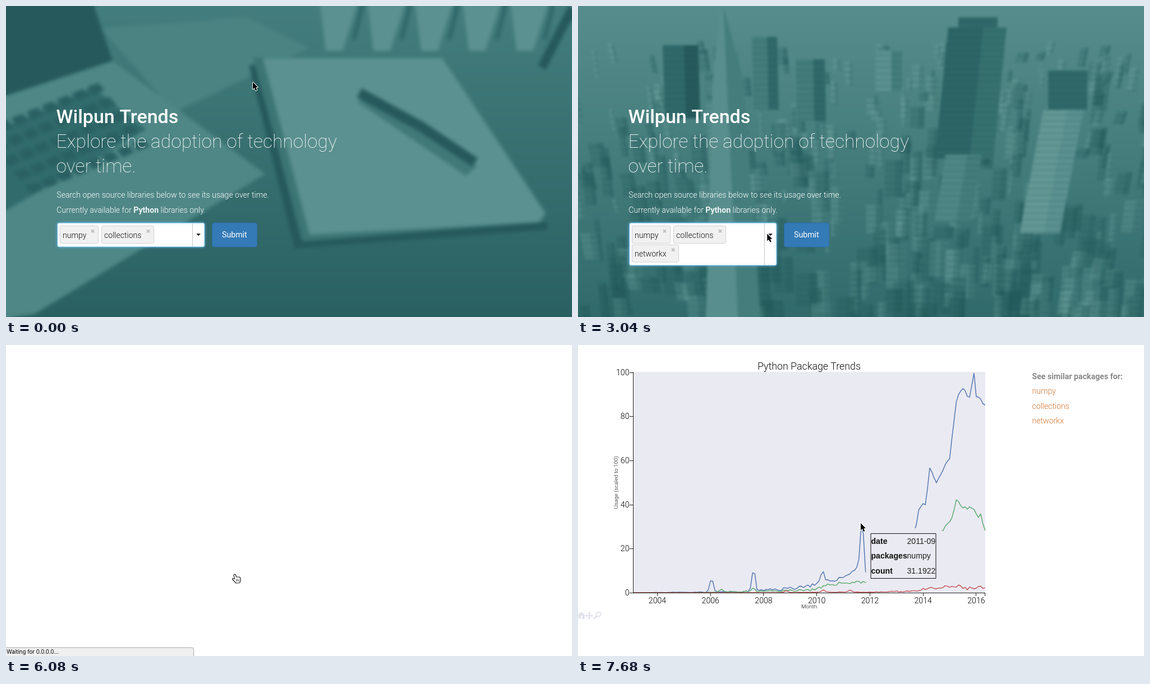
Recreate the animation shown at these times as an HTML page with a canvas. Size 1009x555 px, loop 8 s.

```html
<!DOCTYPE html>
<html lang="en">
<head>
<meta charset="utf-8">
<title>Package trends</title>
<style>
html, body { margin: 0; width: 100%; height: 100%; overflow: hidden; background: #fff; }
canvas { display: block; }
</style>
</head>
<body>
<canvas id="stage" width="1009" height="555"></canvas>
<script>
const W = 1009, H = 555, LOOP = 8000, STEP = 160;
const ROBOTO = 'Roboto, sans-serif';
const ARIAL = '"Liberation Sans", Arial, sans-serif';
const BODY = `300 14.08px ${ROBOTO}`;
const BOLD = `700 14.08px ${ROBOTO}`;
const ctx = document.getElementById('stage').getContext('2d');

const clamp = v => Math.max(0, Math.min(1, v));
const progress = (t, a, b) => clamp((t - a) / (b - a));
const easeOut = p => 1 - (1 - p) * (1 - p);
const smooth = p => p * p * (3 - 2 * p);
const mix = (a, b, p) => a + (b - a) * p;

function random(seed) {
  return () => (seed = (seed * 16807) % 2147483647) / 2147483647;
}

function text(str, x, y, font, color, align = 'left') {
  ctx.font = font;
  ctx.fillStyle = color;
  ctx.textAlign = align;
  ctx.fillText(str, x, y);
  return x + ctx.measureText(str).width;
}

function trace(g, pts) {
  g.beginPath();
  for (let i = 0; i < pts.length; i += 2) g.lineTo(pts[i], pts[i + 1]);
}

function fill(g, color, ...pts) {
  trace(g, pts);
  g.fillStyle = color;
  g.fill();
}

function stroke(g, color, width, ...pts) {
  trace(g, pts);
  g.strokeStyle = color;
  g.lineWidth = width;
  g.stroke();
}

function rect(g, color, x, y, w, h) {
  g.fillStyle = color;
  g.fillRect(x, y, w, h);
}

function box(x, y, w, h, r, color, border) {
  ctx.beginPath();
  ctx.roundRect(x + 0.5, y + 0.5, w - 1, h - 1, r);
  ctx.fillStyle = color;
  ctx.fill();
  ctx.strokeStyle = border;
  ctx.lineWidth = 1;
  ctx.stroke();
}

// ---- blurred backdrops, painted once ----

const DARK = '#25595b', DIM = '#306869', MID = '#457d7d', LIGHT = '#5b9190';
const shade = a => `rgba(32,86,88,${a})`;
const shine = a => `rgba(125,178,174,${a})`;

function scene(top, bottom, blur, paint) {
  const layer = () => Object.assign(document.createElement('canvas'), { width: W, height: H });
  const sharp = layer(), soft = layer();
  const g = sharp.getContext('2d'), out = soft.getContext('2d');
  const sky = g.createLinearGradient(0, 0, 0, H);
  sky.addColorStop(0, top);
  sky.addColorStop(1, bottom);
  rect(g, sky, 0, 0, W, H);
  paint(g);
  out.drawImage(sharp, 0, 0);
  out.filter = `blur(${blur}px)`;
  out.drawImage(sharp, 0, 0);
  return soft;
}

const desk = scene('#447d7d', '#2a6061', 3, g => {
  fill(g, '#4b8383', 170, 40, 430, 20, 540, 75, 300, 190);
  // laptop
  fill(g, '#4f8786', 0, 160, 190, 98, 462, 300, 50, 550, 0, 555);
  fill(g, DARK, 0, 0, 157, 0, 190, 98, 0, 160);
  fill(g, '#316b6c', 0, 215, 155, 145, 250, 220, 0, 365);
  for (let i = 0; i < 40; i++) {
    const col = i % 8, row = Math.floor(i / 8);
    const x = col * 27 + row * 20 - 45, y = 222 + row * 25 - col * 11;
    fill(g, '#2a6062', x, y, x + 20, y - 8, x + 32, y + 5, x + 11, y + 14);
  }
  // notebook and pen
  stroke(g, DARK, 14, 440, 105, 520, 425, 965, 392);
  fill(g, '#3d7575', 440, 92, 780, 92, 960, 385, 530, 420);
  fill(g, LIGHT, 458, 93, 778, 93, 962, 370, 950, 386, 541, 408);
  fill(g, '#417878', 625, 170, 640, 165, 840, 285, 820, 303);
  stroke(g, DARK, 18, 630, 155, 740, 215, 836, 279);
  // glasses
  for (let i = 0; i < 5; i++) {
    const x = 560 + i * 85;
    fill(g, LIGHT, x, 0, x + 65, 0, x + 40, 80, x + 10, 80);
    stroke(g, DIM, 8, x + 75, 0, x + 60, 60);
  }
  stroke(g, DARK, 16, 1009, 5, 955, 110);
});

const city = scene('#578d8c', '#316a6b', 2, g => {
  const rnd = random(71);
  const tower = (x, y, w, h, lean, lit, dark) => {
    fill(g, lit, x, y, x + w, y, x + w + lean, y + h, x + lean, y + h);
    fill(g, dark, x + w * 0.6, y, x + w, y, x + w + lean, y + h, x + w * 0.6 + lean, y + h);
    for (let d = 8; d < h; d += 11)
      stroke(g, shade(0.22), 3, x + lean * d / h, y + d, x + w + lean * d / h, y + d);
  };
  for (let i = 0; i < 420; i++) {
    const y = 60 + 480 * i / 420, x = rnd() * 1050 - 30, s = 0.6 + y / 700;
    tower(x, y, (8 + rnd() * 24) * s, (18 + rnd() * 60) * s, (500 - x) / 60,
      rnd() < 0.45 ? shine(0.24) : shade(0.2), shade(0.25));
  }
  tower(151, 70, 63, 130, 4, DIM, DARK);
  tower(310, 55, 45, 130, 3, MID, DIM);
  tower(388, 95, 52, 110, 2, MID, DIM);
  tower(530, 80, 48, 72, 0, LIGHT, MID);
  fill(g, '#588e8d', 254, 0, 259, 0, 294, 130, 325, 555, 228, 555, 240, 130);
  fill(g, MID, 259, 0, 294, 130, 325, 555, 285, 555);
  tower(678, 20, 70, 30, 0, DIM, DIM);
  tower(660, 38, 104, 235, -24, '#2d6566', '#36706f');
  tower(655, 265, 65, 120, -20, '#4f8786', MID);
  tower(838, 115, 70, 70, 0, DIM, DIM);
  tower(829, 186, 72, 220, -42, '#639896', '#5b9190');
});

const room = scene('#1c5153', '#235a5c', 2, g => {
  fill(g, '#296163', 565, 85, 660, 0, 1009, 0, 1009, 330, 760, 230, 740, 115, 590, 180);
  // window
  fill(g, '#619694', 160, 160, 205, 103, 535, 115, 540, 390, 485, 395, 480, 470, 165, 475);
  for (const x of [294, 418, 538]) stroke(g, '#2b6264', 8, x, 100, x + 2, 480);
  for (const y of [168, 248, 328]) stroke(g, '#2f6768', 9, 160, y - 4, 540, y + 4);
  fill(g, DARK, 150, 110, 205, 103, 165, 165, 170, 475, 150, 475);
  // chairs and table
  rect(g, DARK, 185, 278, 116, 20);
  rect(g, '#316a6b', 160, 495, 380, 60);
  stroke(g, DARK, 13, 150, 487, 350, 490, 540, 480);
  for (let x = 195; x < 370; x += 28) stroke(g, '#1e5355', 8, x, 390, x + (x - 270) / 4, 555);
  for (const y of [397, 444]) stroke(g, '#1c4f51', 12, 484, y, 560, y - 2);
  for (const x of [488, 542]) stroke(g, '#1c4f51', 8, x, 395, x, 555);
  // lamps
  fill(g, '#74a7a4', 0, 97, 22, 97, 32, 116, 0, 115);
  for (const x of [82, 108, 153]) rect(g, LIGHT, x - 3, 97, 7, 18);
  for (let i = 0; i < 12; i++) rect(g, shine(0.13), 90 + i % 4 * 32, 5 + i * 3, 9, 16);
  rect(g, '#316a6b', 203, 0, 6, 70);
  stroke(g, MID, 9, 562, 82, 600, 45, 660, -5);
  stroke(g, DIM, 4, 629, 0, 629, 85);
  rect(g, '#75a8a5', 621, 84, 15, 12);
  // shelves
  const rnd = random(9);
  rect(g, '#225658', 590, 190, 78, 200);
  for (let row = 0; row < 6; row++) {
    const y = 198 + row * 31;
    for (let k = 0; k < 7; k++)
      rect(g, shine(rnd() * 0.6), 594 + k * 10.5, y + 6 - k * 3, 8, 22);
    stroke(g, '#4a8282', 3, 588, y, 667, y - 20);
  }
  fill(g, '#1c5052', 655, 112, 735, 112, 725, 155, 755, 220, 810, 300, 790, 450, 670, 445);
  fill(g, '#1f5456', 560, 470, 700, 455, 1009, 450, 1009, 555, 560, 555);
});

// ---- pointers ----

function arrow(x, y) {
  ctx.save();
  ctx.translate(x, y);
  ctx.scale(0.9, 0.9);
  ctx.lineJoin = 'round';
  const shape = [0, 0, 0, 14, 3.2, 11.2, 5.6, 16.6, 8.2, 15.5, 5.8, 10.2, 10, 10, 0, 0];
  stroke(ctx, '#fff', 2, ...shape);
  fill(ctx, '#000', ...shape);
  ctx.restore();
}

function hand(x, y) {
  ctx.save();
  ctx.translate(x, y);
  ctx.lineJoin = 'round';
  const shape = [-1, 1, 1, 0, 2.5, 1.5, 3.6, 5, 9, 5, 11, 7, 11, 12, 9.5, 15.5, 3, 16, -3.5, 9, -3, 7.3, 0.4, 8.5, -1, 1];
  fill(ctx, '#fff', ...shape);
  stroke(ctx, '#222', 1.2, ...shape);
  for (const i of [3.5, 5.7, 7.9]) stroke(ctx, '#222', 0.8, i, 9, i + 0.3, 13);
  ctx.restore();
}

// ---- search page ----

function tag(label, x, y, w) {
  box(x, y, w, 32, 2, '#f1f1f1', '#d2d2d2');
  text(label, x + 5, y + 21.5, BODY, '#111');
  const cx = x + w - 10.5, cy = y + 9.8;
  for (const s of [-2.5, 2.5]) stroke(ctx, '#bdbdbd', 2, cx - 2.5, cy - s, cx + 2.5, cy + s);
}

function typed(t) {
  const word = 'networkx'.slice(0, Math.ceil(8 * progress(t, 960, 1760)));
  ctx.save();
  ctx.beginPath();
  ctx.rect(268, 395, 32, 26);
  ctx.clip();
  ctx.font = BODY;
  text(word, Math.min(268, 299 - ctx.measureText(word).width), 413.5, BODY, '#111');
  ctx.restore();
}

function searchForm(t, hover) {
  const tagged = t >= 2400, sent = t >= 4480;
  const h = tagged ? 77 : 44;
  ctx.save();
  if (!sent) {
    ctx.shadowColor = 'rgba(102,190,240,.6)';
    ctx.shadowBlur = 5;
  }
  box(91, 386.5, 263.5, h, 3, '#fff', sent ? '#bfc8c8' : '#66b4e2');
  ctx.restore();
  rect(ctx, '#c4c4c4', 332, 388, 1, h - 3);
  fill(ctx, '#111', 339.3, 406.3, 346.9, 406.3, 343.1, 410.3);
  tag('numpy', 96, 392, 69);
  tag('collections', 170, 392, 94);
  if (tagged) tag('networkx', 96, 425.5, 84);
  else typed(t);
  const caretOff = t >= 2880 && t < 3360;
  if (tagged && !sent && !caretOff) rect(ctx, '#111', 184, 433.5, 1, 17);
  if (sent) box(365, 384.5, 85, 48, 5, '#3b85e6', '#3478d4');
  box(367, 386.5, 81, 44, 3.5, hover ? '#286090' : '#337ab7', hover ? '#24578a' : '#2e6da4');
  text('Submit', 407.3, 412.8, `400 14.17px ${ROBOTO}`, '#fff', 'center');
}

function status(label) {
  box(-4, 539.5, 339, 20, 3, '#f0f0f0', '#a8a8a8');
  text(label, 1, 551, '400 9.8px Inter, sans-serif', '#000');
}

function slogan() {
  const thin = `100 33.55px ${ROBOTO}`;
  text('Wilpun Trends', 89.5, 208.8, `500 34px ${ROBOTO}`, '#fff');
  text('Explore the adoption of technology', 89.5, 252.8, thin, '#fff');
  text('over time.', 89.5, 296.8, thin, '#fff');
  text('Search open source libraries below to see its usage over time.', 90.3, 342.3, BODY, '#fff');
  let x = text('Currently available for ', 90.3, 368.5, BODY, '#fff');
  x = text('Python', x, 368.5, BOLD, '#eef6f5');
  text(' libraries only.', x, 368.5, BODY, '#fff');
}

function searchPage(t) {
  const late = t >= 3680;
  ctx.drawImage(late ? city : desk, 0, 0);
  ctx.globalAlpha = easeOut(late ? progress(t, 3680, 4480) : progress(t, 0, 640));
  ctx.drawImage(late ? room : city, 0, 0);
  ctx.globalAlpha = 1;
  slogan();

  const p = smooth(progress(t, 0, 640)), q = smooth(progress(t, 2560, 3680));
  const x = mix(mix(440, 292, p), 407, q), y = mix(mix(136, 405, p), 409, q);
  const hover = t > 2400 && x > 367;
  searchForm(t, hover);
  if (t >= 4480) status('Waiting for 0.0.0.0...');
  if (hover) hand(x, y);
  else if (t < 1120 || t >= 2240) arrow(x, y);
}

// ---- chart page ----

const LEFT = 98, BASE = 442, UNIT = 3.935;
const yearX = year => 141.5 + (year - 2004) * 47.37;

// monthly line through [year, value] points, with spikes and a little noise
function series(color, points, spikes = []) {
  const rnd = random(23), path = [];
  for (let month = 0; month < 160; month++) {
    const year = 2003 + (month + 1) / 12;
    const next = points.findIndex(p => p[0] >= year - 0.001);
    const [x1, v1] = points[next], [x0, v0] = points[Math.max(0, next - 1)];
    let v = x1 > x0 ? mix(v0, v1, progress(year, x0, x1)) : v1;
    v += (rnd() - 0.5) * Math.min(v, 1.6);
    for (const [peak, height] of spikes) v += height * clamp(1 - Math.abs(year - peak) / 0.14);
    path.push(yearX(year), BASE - Math.min(v, 100) * UNIT);
  }
  ctx.lineJoin = 'round';
  stroke(ctx, color, 1.4, ...path);
}

function axes() {
  const font = `300 14.17px ${ROBOTO}`, small = `300 9.9px ${ROBOTO}`;
  rect(ctx, '#222', LEFT, 48, 1, 395);
  rect(ctx, '#222', LEFT, BASE, 628, 1);
  rect(ctx, '#222', 725, BASE, 1, 6);
  for (let v = 0; v <= 100; v += 20) {
    const y = BASE - v * UNIT;
    rect(ctx, '#222', 92, Math.round(y), 6, 1);
    text(v, 91.5, y + 5, font, '#000', 'right');
  }
  for (let year = 2004; year <= 2016; year += 2) {
    rect(ctx, '#222', Math.floor(yearX(year)), BASE, 1, 6);
    text(year, yearX(year), 460.5, font, '#000', 'center');
  }
  text('Python Package Trends', 412, 43.5, `300 17.8px ${ROBOTO}`, '#111', 'center');
  text('Month', 412, 470, small, '#111', 'center');
  ctx.save();
  ctx.translate(70.5, 245.5);
  ctx.rotate(-Math.PI / 2);
  text('Usage (scaled to 100)', 0, 0, small, '#111', 'center');
  ctx.restore();
}

function chart() {
  rect(ctx, '#eaeaf2', LEFT, 48, 628, 394);
  series('#4c72b0',
    [[2003, 0], [2007.4, 0.5], [2009, 2], [2010, 3.7], [2011, 7], [2011.5, 11], [2011.9, 8.5], [2012.4, 10],
      [2012.8, 15.5], [2013.25, 24], [2013.7, 28], [2013.85, 39], [2014.1, 40], [2014.25, 56], [2014.5, 50],
      [2015, 61], [2015.25, 87], [2015.5, 93], [2015.75, 88], [2015.92, 100], [2016, 89], [2016.34, 85]],
    [[2006.04, 7], [2007.62, 11.5], [2010.21, 6], [2011.7, 27], [2012.22, 10.5]]);
  series('#55a868',
    [[2005, 0], [2008, 0.6], [2010, 1.4], [2010.6, 4], [2011.9, 5.2], [2012.6, 12], [2012.9, 10.2],
      [2013.25, 12.2], [2013.6, 19], [2014.4, 28.6], [2014.75, 28], [2015.1, 34], [2015.25, 42.5],
      [2015.4, 39], [2015.92, 38], [2016.1, 33], [2016.17, 35], [2016.34, 28]],
    [[2006.4, 1.4], [2007.6, 1.8]]);
  series('#c44e52',
    [[2008.6, 0], [2011, 0.3], [2012, 0.2], [2013.5, 0.7], [2015.25, 2.9], [2015.7, 1.9], [2016.34, 2.3]],
    [[2008.85, 1], [2010.24, 1], [2011.25, 1]]);
  axes();
}

function sidebar() {
  text('See similar packages for:', 809.5, 61, `700 14.17px ${ROBOTO}`, '#888');
  ['numpy', 'collections', 'networkx'].forEach((name, i) =>
    text(name, 809.5, 87.3 + i * 26.3, BODY, '#d07530'));
}

function tools() {
  const color = '#e2e2ec';
  fill(ctx, color, -1, 483, 6, 476, 13, 483);
  rect(ctx, color, 1, 483, 4, 6);
  rect(ctx, color, 7.5, 483, 4, 6);
  for (let i = 0; i < 4; i++) {
    ctx.save();
    ctx.translate(20, 483);
    ctx.rotate(i * Math.PI / 2);
    rect(ctx, color, -1, -5, 2, 5);
    fill(ctx, color, -3, -4, 0, -7, 3, -4);
    ctx.restore();
  }
  stroke(ctx, color, 3, 33.5, 483.5, 28.5, 488.5);
  ctx.beginPath();
  ctx.arc(36.5, 480.5, 4, 0, 2 * Math.PI);
  ctx.lineWidth = 2;
  ctx.stroke();
}

function tooltip() {
  rect(ctx, '#eaeaf2', 513.5, 327, 135, 99);
  box(521.5, 336, 117, 81, 0, '#eaeaf2', '#111');
  [['date', '2011-09'], ['packages', 'numpy'], ['count', '31.1922']].forEach(([key, value], i) => {
    const y = 354.7 + i * 26.4;
    text(key, 522.5, y, `700 14.1px ${ARIAL}`, '#111');
    text(value, 586.5, y, `400 14.1px ${ARIAL}`, '#222');
  });
}

function resultPage(t) {
  rect(ctx, '#fff', 0, 0, W, H);
  if (t >= 6240) sidebar();
  if (t >= 6400) chart();
  if (t >= 6720) tools();
  if (t < 6720) status(t < 6400 ? 'Waiting for 0.0.0.0...' : 'Waiting for cache...');
  if (t >= 7680) tooltip();
  if (t < 6720) return hand(407, 409);
  const p = smooth(progress(t, 6560, 7200)), q = smooth(progress(t, 7360, 7680));
  arrow(mix(mix(407, 458, p), 504, q), mix(mix(409, 375, p), 318, q));
}

const start = performance.now();

function frame() {
  const t = Math.floor((performance.now() - start) % LOOP / STEP) * STEP;
  if (t < 6080) searchPage(t);
  else resultPage(t);
  requestAnimationFrame(frame);
}
frame();
</script>
</body>
</html>
```
